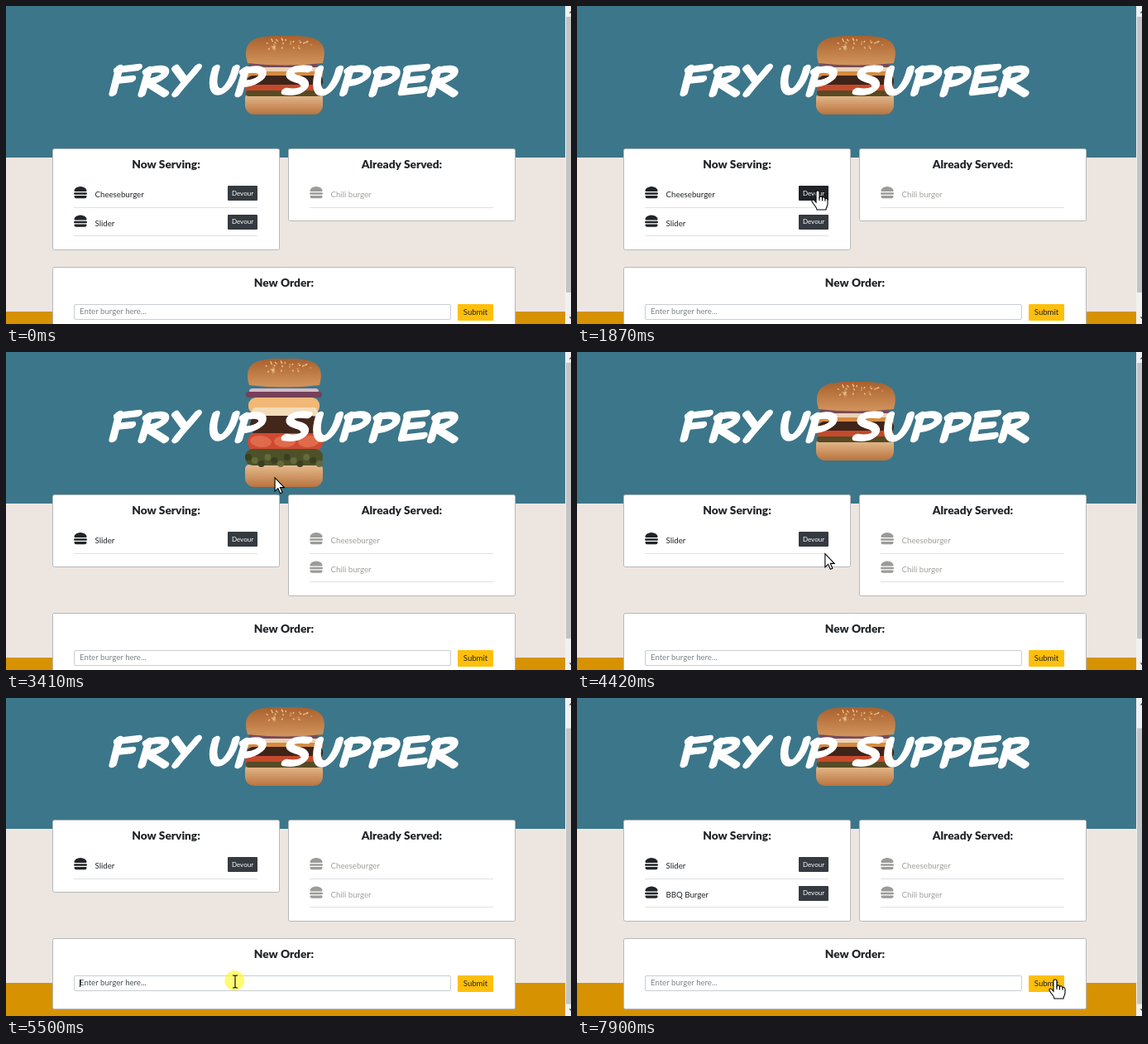
An HTML page with a canvas that plays this animation: 683 px wide and 384 px high, repeating every 7.99 s.

```html
<!DOCTYPE html>
<html lang="en">
<head>
<meta charset="utf-8">
<title>Fry Up Supper</title>
<style>
html, body { margin: 0; width: 100%; height: 100%; overflow: hidden; background: #ede6e0; }
canvas { display: block; width: 683px; height: 384px; }
</style>
</head>
<body>
<canvas id="stage" role="img" aria-label="FRY UP SUPPER: burger ordering page"></canvas>
<script>
const W = 683, H = 384, LOOP = 7990;
const canvas = document.getElementById('stage');
const ctx = canvas.getContext('2d');
const dpr = window.devicePixelRatio || 1;
canvas.width = W * dpr;
canvas.height = H * dpr;

const BODY = 'Lato, "Open Sans", sans-serif';
const DARK = '#212529', GREY = '#9b9b98';

// Times of the page's events, in ms
const SERVED = 2640, FOCUS = 5500, KEY1 = 6200, KEY2 = 6350, LIST = 6430,
      PICK = 6890, SUBMIT = 7670, ADDED = 7820;
const CLICKS = [[2330, 2520], [5500, 5650], [6810, 6930], [7670, 7820]];

// Pointer path: time, x, y
const PATH = [
  [170, 659, 205], [630, 520, 120], [900, 520, 120], [1640, 318, 219],
  [1710, 316, 220], [1870, 291, 223], [3260, 291, 223], [3410, 325, 152],
  [3580, 338, 128], [3730, 338, 128], [4040, 300, 243], [4420, 300, 243],
  [4590, 282, 335], [4740, 278, 333], [4890, 278, 333], [4970, 277, 332],
  [5200, 277, 332], [5360, 277, 342], [6430, 277, 342], [6660, 222, 363],
  [6930, 222, 363], [7430, 586, 350], [7590, 578, 340]
];
const SCROLL = [[4420, 0], [4590, 18], [4740, 25]];

function along(keys, t) {
  if (t <= keys[0][0]) return keys[0].slice(1);
  for (let i = 1; i < keys.length; i++) {
    const a = keys[i - 1], b = keys[i];
    if (t < b[0]) {
      const k = (t - a[0]) / (b[0] - a[0]);
      return a.slice(1).map((v, j) => v + (b[j + 1] - v) * k);
    }
  }
  return keys[keys.length - 1].slice(1);
}

function rect(x, y, w, h, fill) {
  ctx.fillStyle = fill;
  ctx.fillRect(x, y, w, h);
}

function round(x, y, w, h, r, fill, line) {
  ctx.beginPath();
  ctx.roundRect(x, y, w, h, r);
  if (fill) { ctx.fillStyle = fill; ctx.fill(); }
  if (line) { ctx.strokeStyle = line; ctx.lineWidth = 1; ctx.stroke(); }
}

function text(str, x, y, font, fill, align = 'left') {
  ctx.font = font;
  ctx.fillStyle = fill;
  ctx.textAlign = align;
  ctx.fillText(str, x, y);
}

function fade(y, h, top, bottom) {
  const g = ctx.createLinearGradient(0, y, 0, y + h);
  g.addColorStop(0, top);
  g.addColorStop(1, bottom);
  return g;
}

// Burger picture: soft stacked layers
const FILLING = {
  closed: [
    ['#754a5c', 294, 67, 83, 9], ['#ead2b4', 290, 74, 93, 8],
    ['#d58a42', 291, 79, 92, 7], ['#3f2419', 292, 84, 91, 14],
    ['#c5492b', 290, 95, 93, 10], ['#574a24', 290, 102, 93, 7]
  ],
  open: [
    ['#d8b9c4', 294, 44, 84, 8], ['#74405a', 290, 48, 92, 7],
    ['#f1b877', 293, 55, 86, 20], ['#f2dcb9', 297, 67, 80, 11],
    ['#43271b', 295, 77, 85, 23], ['#cf4a30', 292, 98, 91, 21],
    ['#4d5128', 289, 117, 94, 20]
  ]
};

function bunTop(l, r, top, bottom) {
  ctx.beginPath();
  ctx.moveTo(l + 2, bottom);
  ctx.bezierCurveTo(l - 8, top - 1, l + 22, top, (l + r) / 2, top);
  ctx.bezierCurveTo(r - 22, top, r + 8, top - 1, r - 2, bottom);
  ctx.quadraticCurveTo((l + r) / 2, bottom + 5, l + 2, bottom);
  ctx.fillStyle = fade(top, bottom - top, '#a9602d', '#cf9159');
  ctx.fill();
  let seed = 7;
  const rnd = () => (seed = seed * 16807 % 2147483647) / 2147483647;
  for (let i = 0; i < 34; i++) {
    const a = rnd() * 6.283, d = Math.sqrt(rnd());
    ctx.beginPath();
    ctx.ellipse((l + r) / 2 + Math.cos(a) * d * 33, top + 11 + Math.sin(a) * d * 8, 1.4, .8, a, 0, 7);
    ctx.fillStyle = i % 3 ? '#e8c08d' : '#d39b62';
    ctx.fill();
  }
}

function burger(open) {
  const y = open ? 136 : 106, h = open ? 27 : 25;
  round(289, y, 94, h, [5, 5, 11, 11], fade(y, h, '#e6bd90', '#b9743f'));
  for (const [c, x, top, w, ht] of FILLING[open ? 'open' : 'closed'])
    round(x, top, w, ht, ht / 2.2, c);
  if (open) {
    for (let i = 0; i < 3; i++) {
      ctx.beginPath();
      ctx.ellipse(308 + i * 29, 108, 13, 7, .1 - i * .1, 0, 7);
      ctx.fillStyle = '#e06a4c';
      ctx.fill();
    }
    for (let i = 0; i < 12; i++) {
      ctx.beginPath();
      ctx.arc(293 + i * 7.8, 127 + i % 3 * 4, 4, 0, 7);
      ctx.fillStyle = i % 2 ? '#66693a' : '#3a3f20';
      ctx.fill();
    }
    bunTop(292, 381, 8, 40);
  } else {
    bunTop(290, 385, 36, 69);
  }
}

// Brush lettering
const GLYPHS = {
  F: 'M4 1L0 31M2 3L27 0M2 16L21 14',
  R: 'M5 2L0 31M2 4C31 -6 34 12 4 17L28 31',
  Y: 'M2 1L14 15M29 0C21 12 12 22 6 32',
  U: 'M3 1C-5 39 22 39 27 1',
  P: 'M5 2L0 31M2 4C33 -6 34 17 4 19',
  S: 'M25 2C-2 -1 -1 11 12 14C31 18 24 33 0 29',
  E: 'M4 2L0 30M3 2L26 0M2 16L22 14M0 30L26 27'
};
const WORDS = [['FRY', 133, 35], ['UP', 251, 34], ['SUPPER', 341, 35.3]];

function headline() {
  ctx.strokeStyle = '#fff';
  ctx.lineWidth = 7;
  ctx.lineCap = ctx.lineJoin = 'round';
  for (const [word, x, step] of WORDS) {
    [...word].forEach((ch, i) => {
      const glyph = new Path2D(GLYPHS[ch]);
      for (let k = -1; k < 2; k++) {
        ctx.save();
        ctx.translate(x + i * step + k * 1.3, 74 + i % 2 - k * .8);
        ctx.transform(1, 0, -.12, 1, 0, 0);
        ctx.stroke(glyph);
        ctx.restore();
      }
    });
  }
}

function card(x, y, w, h, title) {
  round(x + .5, y + .5, w - 1, h - 1, 2, '#fff', '#b5b8ba');
  text(title, x + w / 2, y + 24, '900 13.7px ' + BODY, DARK, 'center');
}

function icon(x, y, fill) {
  ctx.fillStyle = fill;
  ctx.beginPath();
  ctx.moveTo(x + 1, y + 6);
  ctx.bezierCurveTo(x - 1, y + 4, x + 3, y, x + 8, y);
  ctx.bezierCurveTo(x + 13, y, x + 17, y + 4, x + 15, y + 6);
  ctx.fill();
  round(x, y + 7.2, 16, 2.6, 1.3, fill);
  round(x + .5, y + 11, 15, 3.2, [.5, .5, 2.5, 2.5], fill);
}

function rows(list, x, served, mx, my) {
  list.forEach((name, i) => {
    const y = 217 + i * 34.5;
    icon(x, y + 1, served ? GREY : DARK);
    text(name, x + 25.5, y + 14.2, '9.7px ' + BODY, served ? '#9fa19a' : DARK);
    rect(x, Math.floor(y + 26), 222, 1, '#dfe1e2');
    if (served) return;
    const hot = inside(mx, my, x + 186, y, 36, 18);
    round(x + 186, Math.round(y), 36, 18, 1, hot ? '#1f2327' : '#343a40');
    text('Devour', x + 204, y + 11.7, '8px ' + BODY, '#fff', 'center');
  });
}

function inside(px, py, x, y, w, h) {
  return px >= x && px < x + w && py >= y && py < y + h;
}

function typed(t) {
  if (t < KEY1 || t >= ADDED) return '';
  return t < KEY2 ? 'B' : t < PICK ? 'BB' : 'BBQ Burger';
}

function form(t) {
  card(56, 315, 560, 86, 'New Order:');
  const focus = t >= FOCUS && t < SUBMIT;
  if (focus) {
    ctx.globalAlpha = Math.min(1, (t - FOCUS) / 150);
    round(80, 358, 460, 23, 3, '#bfdeff');
    ctx.globalAlpha = 1;
  }
  round(82.5, 360.5, 455, 18, 1.5, '#fff', focus && t > FOCUS + 60 ? '#80bdff' : '#c9ced3');
  const value = typed(t);
  text(value || 'Enter burger here...', 89, 372.3, '9.6px ' + BODY,
       value ? '#343a40' : focus ? '#45525a' : '#7b8685');
  if (t >= FOCUS && t < 6050) rect(89, 365, 1, 9, '#111');
  round(546, 360, 43, 20, 1, '#ffbf0a');
  text('Submit', 567.5, 373.2, '9.6px ' + BODY, DARK, 'center');
  if (t >= LIST && t < PICK) {
    ctx.save();
    ctx.shadowColor = 'rgba(0,0,0,.55)';
    ctx.shadowBlur = 4 * dpr;
    ctx.shadowOffsetX = ctx.shadowOffsetY = 2 * dpr;
    rect(81, 379, 456, 23, '#e9ecea');
    ctx.restore();
    ctx.strokeStyle = '#8d9091';
    ctx.lineWidth = 1;
    ctx.strokeRect(81.5, 379.5, 455, 22);
    text('BBQ Burger', 87, 395, '11.2px "Open Sans", "Noto Sans", sans-serif', '#111');
  }
}

function scrollbar(scroll) {
  rect(676, 0, 7, H, '#f1f1f1');
  rect(677, 13 + scroll * .94, 6, 333, '#c4c4c4');
  ctx.fillStyle = '#454545';
  for (const [y, d] of [[5, 1], [379, -1]]) {
    ctx.beginPath();
    ctx.moveTo(680.5, y + 3.5 * d);
    ctx.lineTo(684, y);
    ctx.lineTo(687.5, y + 3.5 * d);
    ctx.fill();
  }
}

const ARROW = new Path2D('M0 0V16.2L3.8 12.8L6.4 18.8L9 17.7L6.4 11.8H11.3Z');
const HAND = new Path2D('M-2 1.5C-2 -.6 2 -.6 2 1.5V8C3 6.2 5.5 6.6 5.5 8.6C6.5 7.2 9 7.8 9 9.8C10.4 8.8 12 9.8 12 11.6V16C12 19 10 20 10 23H-1C-1 20 -5 17 -7 13C-7.6 10.8 -5 10.2 -3.5 12.3L-2 14Z');
const FINGERS = new Path2D('M2 8V12M5.5 8.6V12.4M9 9.8V12.8');
const BEAM = new Path2D('M-3 -7H-1L0 -6L1 -7H3M0 -6V7M-3 8H-1L0 7L1 8H3');

function pointer(t, x, y, scroll, count) {
  if (CLICKS.some(([a, b]) => t >= a && t < b)) {
    ctx.beginPath();
    ctx.arc(x - .7, y - .8, 12, 0, 7);
    ctx.fillStyle = 'rgba(252,248,40,.65)';
    ctx.fill();
  }
  const py = y + scroll;
  let hand = inside(x, py, 546, 360, 43, 20);
  for (let i = 0; i < count; i++) hand = hand || inside(x, py, 268, 217 + i * 34.5, 36, 18);
  ctx.save();
  ctx.translate(x, y);
  ctx.lineCap = 'butt';
  ctx.lineJoin = 'miter';
  ctx.lineWidth = 1.1;
  ctx.strokeStyle = '#000';
  ctx.fillStyle = '#fff';
  if (inside(x, py, 82, 360, 456, 19)) {
    ctx.stroke(BEAM);
  } else {
    const shape = hand ? HAND : ARROW;
    ctx.fill(shape);
    ctx.stroke(shape);
    if (hand) ctx.stroke(FINGERS);
  }
  ctx.restore();
}

function draw(t) {
  const [scroll] = along(SCROLL, t);
  const [mx, my] = t < 170 ? [-50, 300] : along(PATH, t);
  const py = my + scroll;
  const serving = t < SERVED ? ['Cheeseburger', 'Slider']
    : t < ADDED ? ['Slider'] : ['Slider', 'BBQ Burger'];
  const served = t < SERVED ? ['Chili burger'] : ['Cheeseburger', 'Chili burger'];
  const cardHeight = list => list.length > 1 ? 123 : 88;

  ctx.setTransform(dpr, 0, 0, dpr, 0, 0);
  rect(0, 0, W, H, '#ede6e0');
  ctx.save();
  ctx.translate(0, -Math.round(scroll));
  rect(0, 0, W, 183, '#3c768a');
  rect(0, 369, W, 60, '#d69200');
  burger(t >= 170 && py < 172);
  headline();
  card(56, 172, 275, cardHeight(serving), 'Now Serving:');
  rows(serving, 82, false, mx, py);
  card(341, 172, 275, cardHeight(served), 'Already Served:');
  rows(served, 367, true);
  form(t);
  ctx.restore();
  scrollbar(scroll);
  if (t >= 170) pointer(t, mx, my, scroll, serving.length);
}

const start = performance.now();
function tick(now) {
  draw(Math.max(0, now - start) % LOOP);
  requestAnimationFrame(tick);
}
draw(0);
requestAnimationFrame(tick);
</script>
</body>
</html>
```
